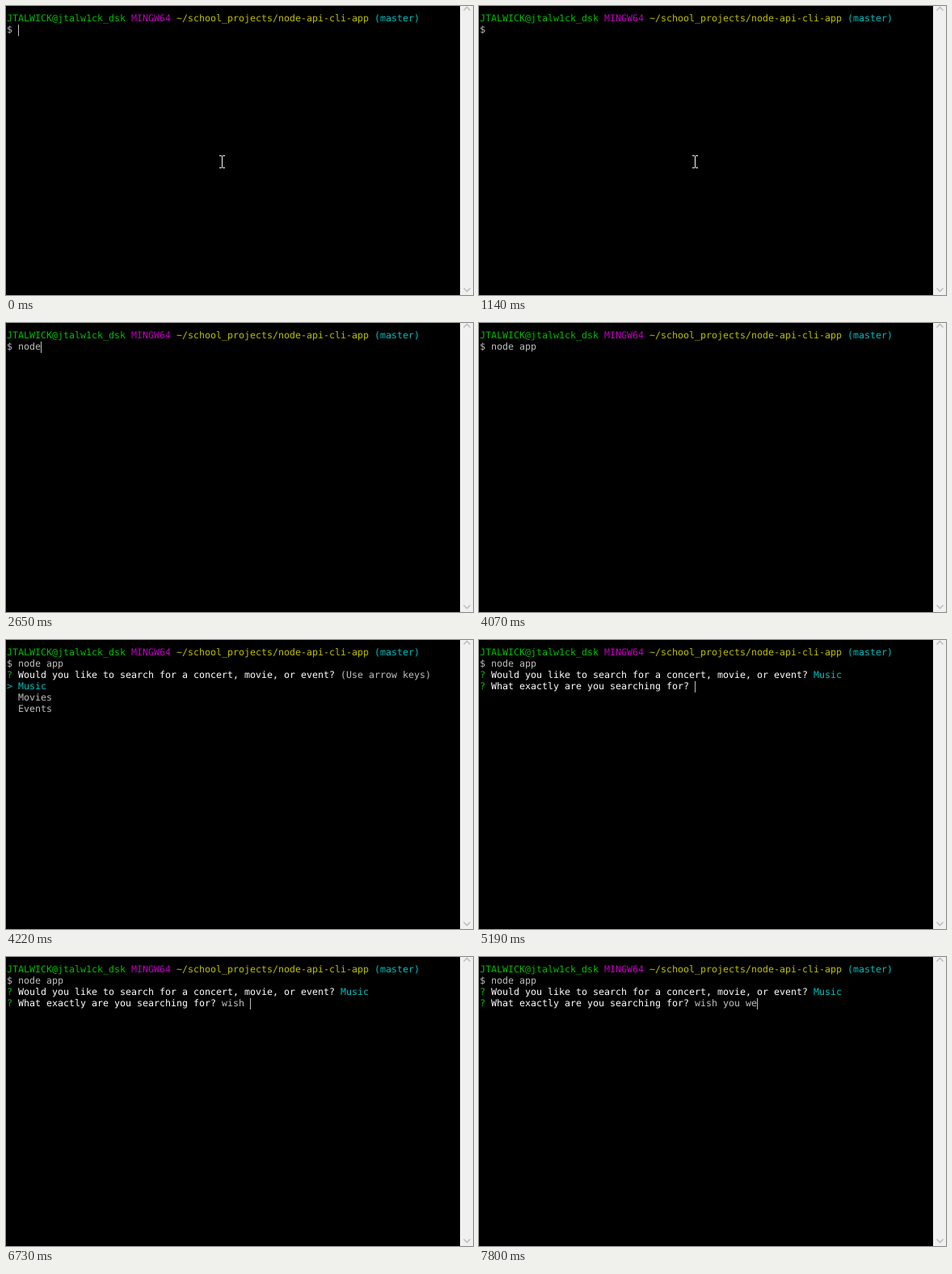
An HTML page that plays this animation: 578 by 358 pixels, repeating every 8000 ms.

```html
<!DOCTYPE html>
<html lang="en">
<head>
<meta charset="utf-8">
<title>Terminal session</title>
<style>
  html, body { margin: 0; width: 578px; height: 358px; overflow: hidden; background: #000; }
  pre {
    position: absolute; left: 1px; top: 8px; margin: 0; color: #bfbfbf;
    font: 11.63px/14px "DejaVu Sans Mono", monospace;
    font-variant-ligatures: none; text-rendering: geometricPrecision;
  }
  .green { color: #00bf00 }
  .magenta { color: #bf00bf }
  .yellow { color: #bfbf00 }
  .cyan { color: #00bfbf }
  .white { color: #fff }
  #caret { position: absolute; width: 1px; height: 14px; background: #bfbfbf; }
  svg { position: absolute; left: 0; top: 0; fill: none; }
</style>
</head>
<body>
<pre id="screen"></pre>
<div id="caret"></div>
<svg width="578" height="358">
  <path fill="#f0f0f0" d="M562 0h16v358h-16z"/>
  <path stroke="#bfbfbf" stroke-width="1.6" d="M566.5 5.5l4-4 4 4M566.5 349.5l4 4 4-4"/>
  <path id="pointer" stroke="#fff" shape-rendering="crispEdges"
    d="M264 185.5h3m1 0h3M267.5 186v14M264 200.5h3m1 0h3"/>
</svg>
<script>
const LOOP = 8000, CELL = 7, LINE = 14, LEFT = 1, TOP = 9;
const POINTER_END = 1980, ENTER = 3350, MENU = 4220, CHOSEN = 5190;
const $ = id => document.getElementById(id);
const ink = (color, text) => `<span class="${color}">${text}</span>`;

// Each entry: time, number of characters typed so far
const command = { text: 'node app', keys: [[2100, 1], [2250, 2], [2370, 3], [2650, 4], [2770, 5], [2920, 6], [3050, 8]] };
const search = { text: 'wish you we', keys: [[6020, 1], [6170, 2], [6450, 3], [6600, 4], [6730, 5],
  [7130, 6], [7250, 8], [7370, 9], [7650, 10], [7800, 11]] };
const caretOff = [[130, 560], [1140, 1700], [4070, 5190], [5750, 6020]];

const typed = ({ text, keys }, t) =>
  text.slice(0, keys.reduce((n, [at, count]) => t >= at ? count : n, 0));

const prompt = [ink('green', 'JTALWICK@jtalw1ck_dsk'), ink('magenta', 'MINGW64'),
  ink('yellow', '~/school_projects/node-api-cli-app'), ink('cyan', '(master)')].join(' ');
const ask = text => ink('green', '?') + ' ' + ink('white', text) + ' ';
const kind = ask('Would you like to search for a concert, movie, or event?');
const what = 'What exactly are you searching for?';

let shown;
function draw(now) {
  const t = now % LOOP;
  const cmd = typed(command, t), query = typed(search, t);
  const lines = [prompt, '$ ' + cmd];
  let row = 1, col = 2 + cmd.length;

  if (t >= ENTER) { row = 2; col = 0; }
  if (t >= CHOSEN) {
    lines.push(kind + ink('cyan', 'Music'), ask(what) + query);
    row = 3;
    col = what.length + 3 + query.length;
  } else if (t >= MENU) {
    lines.push(kind + '(Use arrow keys)', ink('cyan', '&gt; Music'), '  Movies', '  Events');
  }

  const html = lines.join('\n');
  if (html !== shown) $('screen').innerHTML = shown = html;

  const caret = $('caret').style;
  caret.left = LEFT + col * CELL + 'px';
  caret.top = TOP + row * LINE + 'px';
  caret.visibility = caretOff.some(([from, to]) => t >= from && t < to) ? 'hidden' : 'visible';
  $('pointer').style.visibility = t < POINTER_END ? 'visible' : 'hidden';
}

const start = performance.now();
function tick() {
  draw(performance.now() - start);
  requestAnimationFrame(tick);
}
tick();
</script>
</body>
</html>
```
